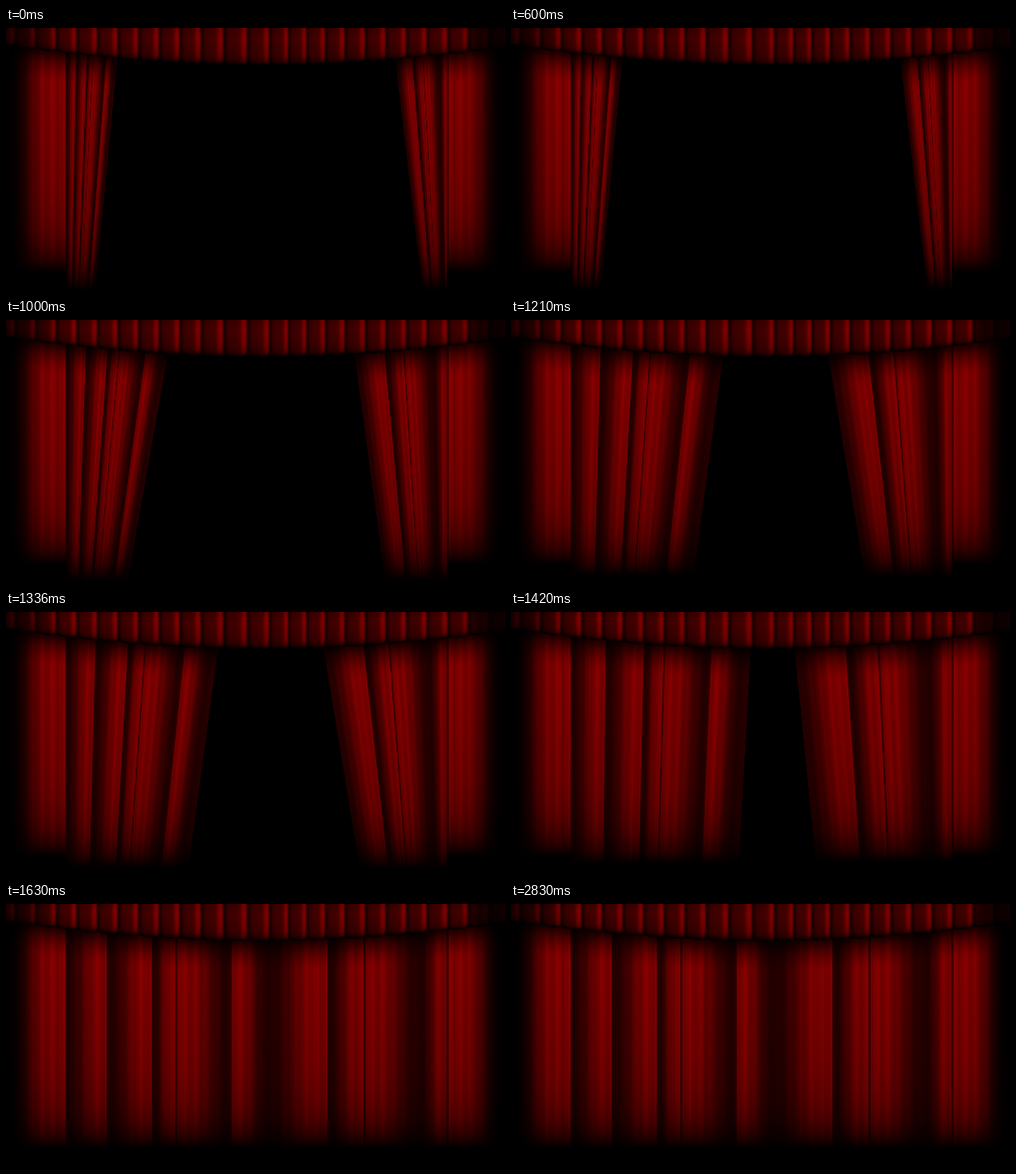
An HTML page with a canvas that plays this animation: 620 px wide and 329 px high, repeating every 3630 ms.

```html
<!DOCTYPE html>
<html lang="en">
<head>
<meta charset="utf-8">
<title>Stage curtain</title>
<style>
html, body { margin: 0; width: 100%; height: 100%; overflow: hidden; background: #000; }
canvas { display: block; width: 100vw; height: 100vh; }
</style>
</head>
<body>
<canvas id="stage" width="620" height="329"></canvas>
<script>
const W = 620, H = 329;
const LEFT = 75, RIGHT = 548;        // fixed sides of the two drapes
const LEFT_SPAN = 263, RIGHT_SPAN = 220;
const CLOTH_TOP = 20, HEM = 305;
const HOLD = 1000, STEP = 210, LOOP = 3630;

// Drape widths per pose: top and bottom.
const poses = [
  { left: [63, 37],   right: [64, 32] },
  { left: [126, 78],  right: [115, 78] },
  { left: [189, 152], right: [154, 109] },
  { left: [223, 208], right: [196, 169] },
  { left: [LEFT_SPAN, LEFT_SPAN], right: [RIGHT_SPAN, RIGHT_SPAN] }
];

// Folds of the closed curtain, each from its dark side to its bright side.
const folds = [
  [0, 75], [75, 126], [126, 182], [182, 211], [279, 211], [325, 279],
  [325, 400], [400, 445], [515, 445], [515, 548], [620, 548]
];

function smooth(a, b, x) {
  const t = Math.min(1, Math.max(0, (x - a) / (b - a)));
  return t * t * (3 - 2 * t);
}

function randomFrom(seed) {
  return () => (seed = seed * 16807 % 2147483647) / 2147483647;
}

function makeCanvas() {
  const c = document.createElement('canvas');
  c.width = W;
  c.height = H;
  return c;
}

const red = v => `rgb(${Math.round(v)},0,0)`;
const dark = a => `rgba(0,0,0,${a})`;

// One pixel column whose shade follows level(t), t running from 0 to 1.
function column(g, x, y0, y1, level, colour) {
  const grad = g.createLinearGradient(0, y0, 0, y1), n = 16;
  for (let i = 0; i <= n; i++) grad.addColorStop(i / n, colour(level(i / n)));
  g.fillStyle = grad;
  g.fillRect(x, y0, 1, y1 - y0);
}

function clothLevel(x) {
  const [from, to] = folds.find(([a, b]) => x >= Math.min(a, b) && x < Math.max(a, b));
  const t = (x - from) / (to - from);
  const crease = Math.abs(x - to) < 1.5 ? 0.5 : 1;
  const sides = smooth(0, 40, x) * smooth(W, W - 40, x);
  return (38 + 92 * smooth(0.05, 0.75, t)) * crease * sides;
}

function makeCloth() {
  const c = makeCanvas(), g = c.getContext('2d'), rnd = randomFrom(41);
  const fall = t => (1 - 0.25 * t) * (1 - t ** 9);
  for (let x = 0; x < W; x++) {
    const weave = 1 + 0.08 * Math.sin(x * 0.46) + 0.14 * (rnd() - 0.5);
    const level = clothLevel(x) * weave;
    column(g, x, CLOTH_TOP, HEM, t => level * fall(t), red);
  }
  return c;
}

function pleatPhase(x) {
  const sag = 9 * Math.exp(-(((x - 325) / 55) ** 2));
  return (((x - 11.4 - sag) / 25.6) % 1 + 1) % 1;
}

function makeValance() {
  const c = makeCanvas(), g = c.getContext('2d');
  const drop = t => (0.8 + 0.2 * smooth(0, 0.3, t) - 0.3 * t) * (1 - t ** 10);
  for (let x = 0; x < W; x++) {
    const u = pleatPhase(x);
    const ends = (0.35 + 0.65 * smooth(0, 80, x)) * (0.2 + 0.8 * smooth(600, 560, x));
    const gleam = 62 * Math.exp(-(((u - 0.82) / 0.13) ** 2));
    const level = (62 + 20 * u + gleam) * (1 - 0.6 * smooth(0.9, 1, u)) * (0.5 + 0.5 * smooth(0, 0.2, u)) * ends;
    const edge = 45 - 25 * Math.abs((x - 318) / 318) ** 1.9 + 1.5 * Math.sin(u * Math.PI);
    column(g, x, Math.floor(edge) - 2, edge + 40, t => 0.9 * (1 - t) ** 1.6, dark);
    column(g, x, 0, edge, t => level * drop(t), red);
  }
  return c;
}

const cloth = makeCloth(), valance = makeValance();
const ctx = document.getElementById('stage').getContext('2d');
ctx.imageSmoothingQuality = 'high';

// Gathers a span of cloth towards its fixed side; side is 1 for left, -1 for right.
function drape(fixed, side, span, [top, bottom]) {
  const hem = HEM + 22 * (1 - (top / span) ** 3);
  const src = side > 0 ? fixed : fixed - span;
  for (let y = CLOTH_TOP; y < hem; y++) {
    const width = top + (bottom - top) * (y - 42) / 273;
    const row = CLOTH_TOP + Math.floor((y - CLOTH_TOP) * (HEM - CLOTH_TOP) / (hem - CLOTH_TOP));
    ctx.drawImage(cloth, src, row, span, 1, side > 0 ? fixed : fixed - width, y, width, 1);
  }
}

function draw(pose) {
  ctx.fillStyle = '#000';
  ctx.fillRect(0, 0, W, H);
  ctx.drawImage(cloth, 0, 0, LEFT, H, 0, 0, LEFT, H);
  ctx.drawImage(cloth, RIGHT, 0, W - RIGHT, H, RIGHT, 0, W - RIGHT, H);
  drape(LEFT, 1, LEFT_SPAN, pose.left);
  drape(RIGHT, -1, RIGHT_SPAN, pose.right);
  ctx.drawImage(valance, 0, 0);
}

function poseAt(t) {
  const i = t < HOLD ? 0 : 1 + Math.floor((t - HOLD) / STEP);
  return poses[Math.min(i, poses.length - 1)];
}

const start = performance.now();
let shown = null;

function tick() {
  const pose = poseAt((performance.now() - start) % LOOP);
  if (pose !== shown) draw(shown = pose);
  requestAnimationFrame(tick);
}
tick();
</script>
</body>
</html>
```
